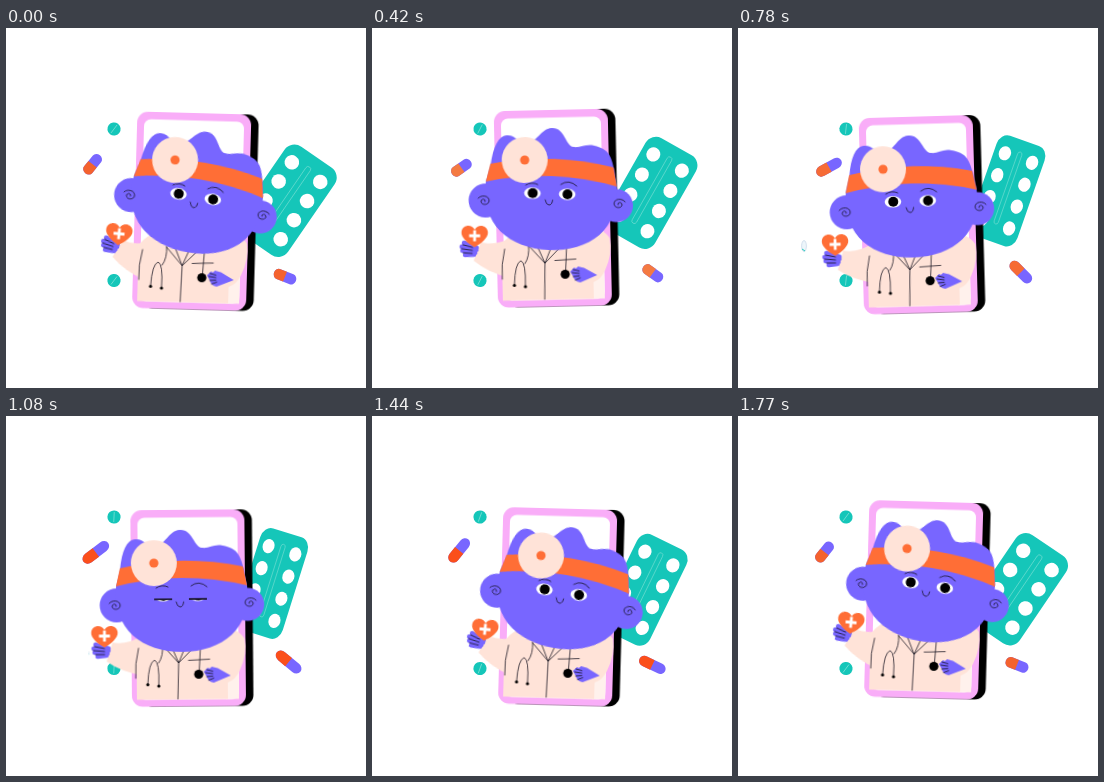
An HTML page for the animation above (1800 ms loop, 360 by 360 pixels).

```html
<!DOCTYPE html>
<html lang="en">
<head>
<meta charset="utf-8">
<title>Phone doctor</title>
<style>
  @property --x { syntax: "<number>"; inherits: false; initial-value: 0; }
  @property --y { syntax: "<number>"; inherits: false; initial-value: 0; }
  @property --r { syntax: "<number>"; inherits: false; initial-value: 0; }
  @property --k { syntax: "<number>"; inherits: false; initial-value: 0; }

  html, body { margin: 0; width: 100%; height: 100%; overflow: hidden; background: #fff; }
  svg {
    display: block; width: 100%; height: 100%;
    --purple: #7866ff; --orange: #ff6e36;
    --teal: #15c6b9; --cream: #ffe3d8; --pink: #f9adf8; --ink: #120f1c;
  }

  /* Sine drift: centre (c*), amplitude (a*) and peak time through the delays */
  .float {
    animation: x .9s, y .9s, r .9s, k .9s;
    animation-timing-function: cubic-bezier(.364, 0, .636, 1);
    animation-iteration-count: infinite;
    animation-direction: alternate;
    animation-delay: var(--dx, 0s), var(--dy, 0s), var(--dr, 0s), var(--dk, 0s);
    transform:
      translate(calc((var(--cx) + var(--ax) * var(--x)) * 1px), calc((var(--cy) + var(--ay) * var(--y)) * 1px))
      rotate(calc((var(--cr) + var(--ar) * var(--r)) * 1deg))
      scaleX(calc(var(--ck) + var(--ak) * var(--k)));
    --cx: 0; --ax: 0; --cy: 0; --ay: 0; --cr: 0; --ar: 0; --ck: 1; --ak: 0;
  }
  @keyframes x { from { --x: 1; } to { --x: -1; } }
  @keyframes y { from { --y: 1; } to { --y: -1; } }
  @keyframes r { from { --r: 1; } to { --r: -1; } }
  @keyframes k { from { --k: 1; } to { --k: -1; } }

  .pack { --cx: 273.5; --ax: 8; --dx: -1.64s; --cy: 168.5; --ay: 6; --dy: -.22s;
          --cr: 26; --ar: 9; --dr: -1.71s; --ck: .92; --ak: .1; --dk: -1.7s; }
  .capL { --cx: 88.7; --ax: 2.3; --dx: -1.02s; --cy: 137.2; --ay: 2.8; --dy: -1.25s;
          --cr: -41; --ar: 12; --dr: -1.08s; --ak: .18; --dk: -.67s; }
  .capR { --cx: 281; --ax: 2; --dx: -.9s; --cy: 246.7; --ay: 2.6; --dy: -.2s;
          --cr: 33; --ar: 12; --dr: -1s; --ak: .16; --dk: -.67s; }
  .tablet { --cx: 108; --cr: 20; --ar: 18; --dr: -1.71s; }
  .bob { --ay: 6.5; --dy: -.59s; }

  /* The capsule caps redden as they swing round */
  .tint { animation: tint 1.8s ease-in-out infinite; }
  @keyframes tint {
    0%, 100% { color: #f4622e; }
    20%, 32% { color: #f47a42; }
    60%, 80% { color: #fb4f1b; }
  }

  .tilt { transform-origin: 184px 282px; animation: tilt 1.8s ease-in-out infinite; }
  @keyframes tilt {
    0%, 82%, 100% { transform: rotate(1.6deg); }
    30%, 45% { transform: rotate(-1.6deg); }
  }

  .turn { animation: turn 1.8s ease-in-out infinite; }
  @keyframes turn {
    0%, 14%, 79%, 100% { transform: translate(var(--sx, 0px), var(--sy, 0px)) rotate(var(--a, 0deg)); }
    31.5% { transform: translate(0px, 0px) rotate(0deg); }
    59% { transform: translate(0px, var(--nod, 0px)) rotate(0deg); }
  }
  .head { --sx: 10px; --a: 8deg; --nod: 2px; }
  .body { --sx: 2px; }
  .arm { --sx: 2.5px; --sy: 1.5px; --a: 13deg; transform-origin: 130px 243px; }
  .heart { --a: -9deg; }

  .lid { transform: scaleY(0); animation: blink 1.8s infinite; }
  @keyframes blink {
    0%, 56.7%, 70%, 100% { transform: scaleY(0); }
    63.3% { transform: scaleY(1); }
  }

  .speck { opacity: 0; animation: speck 1.8s infinite; }
  @keyframes speck {
    0%, 38% { opacity: 0; transform: translate(64px, 214px); }
    43.3% { opacity: 1; transform: translate(66px, 218px); }
    60% { opacity: .8; transform: translate(83px, 237px) scale(.3); }
    62%, 100% { opacity: 0; transform: translate(85px, 239px) scale(.2); }
  }

  .line { fill: none; stroke: var(--ink); stroke-width: .75; stroke-linecap: round; stroke-linejoin: round; }
  .skin { fill: var(--purple); }
  .coat { fill: var(--cream); }
</style>
</head>
<body>
<svg viewBox="0 0 360 360">
  <defs>
    <g id="row" fill="#fff"><circle cx="-17" r="7.2"/><circle cx="17" r="7.2"/></g>
    <g id="tablet">
      <circle r="6.6" fill="var(--teal)"/>
      <path d="M0-5V5" stroke="#79ded4" stroke-width=".8"/>
    </g>
    <g id="capsule">
      <rect x="-13.2" y="-5.3" width="26.4" height="10.6" rx="5.3" fill="var(--purple)"/>
      <path d="M0-5.3H-7.9A5.3 5.3 0 0 0-7.9 5.3H0Z" fill="currentColor"/>
    </g>
    <g id="eye">
      <ellipse rx="8.3" ry="5.8" fill="#fff"/>
      <circle cx=".3" r="5" fill="#000"/>
    </g>
    <g id="lid">
      <rect x="-9.5" width="19" height="13" class="skin"/>
      <rect x="-9" y="11.4" width="18" height="2" fill="var(--ink)"/>
    </g>
    <path id="curl" class="line" d="M-6-2C-3-6 5-5 5 0C5 5-3 5-3 1C-3-2 2-2 1 1"/>
  </defs>

  <g class="float pack">
    <rect x="-30" y="-53" width="60" height="106" rx="12" fill="var(--teal)"/>
    <use href="#row" y="-34.8"/><use href="#row" y="-11.6"/>
    <use href="#row" y="11.6"/><use href="#row" y="34.8"/>
    <rect x="-2.6" y="-41" width="5.2" height="76" rx="2.6" fill="none" stroke="#6fdcd1" stroke-width=".7"/>
  </g>
  <g class="float tablet" style="--cy:101"><use href="#tablet"/></g>
  <g class="float tablet" style="--cy:252.5"><use href="#tablet"/></g>
  <g class="float capL"><g class="tint"><use href="#capsule"/></g></g>
  <g class="float capR"><g class="tint"><use href="#capsule"/></g></g>
  <g class="speck">
    <ellipse rx="2.4" ry="5.5" fill="#eef6fb" stroke="#c3d3e6" stroke-width=".7"/>
    <path d="M-2 3L1 5" stroke="var(--teal)"/>
  </g>

  <g class="float bob"><g class="tilt">
    <rect x="135" y="88" width="112.5" height="196.5" rx="11"/>
    <rect x="126" y="88" width="114" height="196.5" rx="11" fill="var(--pink)"/>
    <rect x="133" y="95.5" width="100" height="182" rx="7" fill="#fff"/>

    <g class="turn arm">
      <path class="coat" d="M107 220Q120 223 136 214V253Q115 249 101 239Z"/>
      <path d="M103 226L90 222M103 228L88 226M102 231L89 230M101 233L92 234" fill="none"
        stroke="var(--purple)" stroke-width="4.5" stroke-linecap="round"/>
      <path class="line" d="M99 226L89 224M99 229L88 228M99 232L90 232"/>
      <g transform="translate(99 213.5)"><g class="turn heart">
        <path fill="var(--orange)" d="M0 11.5C-6 8-14 2-13.2-4C-12-11-3-12 0-6C3-12 12-11 13.2-4C14 2 6 8 0 11.5Z"/>
        <path d="M0-5.5V5.5M-5.5 0H5.5" stroke="#fff" stroke-width="2.8"/>
      </g></g>
    </g>

    <rect x="220" y="250" width="13" height="27.5" fill="#fff1ec"/>
    <path class="coat" d="M131 277.5V222Q140 208 160 206H215Q232 206 239 217Q242 232 234 249Q230 258 222 261V277.5Z"/>
    <g class="turn body">
      <path class="line" d="M133 226Q129 242 130 256M157 223L173 241L190 224M165 222L173 241L181 222M173 241L172 277"/>
      <path class="line" d="M142 262Q143 240 149 238Q154 240 153 263M157 222Q158 234 153 241M195 224L193.5 250M183 238.5L204 237.5"/>
      <circle cx="142" cy="262.5" r="1.6"/><circle cx="153" cy="264" r="1.6"/>
      <circle cx="193" cy="252.5" r="4.6"/>
      <path class="skin" d="M198 250L202 246Q204 248 206 245L212 246.5L225 254L208 261Q202 260 201 255Z"/>
      <path class="line" d="M201 248L207 249.5M200 251L207 252M201 255L207 254.5M203 258.5L208 256.5"/>
    </g>

    <g transform="translate(177 180)"><g class="turn head">
      <circle class="skin" cx="-65.5" cy="1" r="17"/>
      <circle class="skin" cx="65.5" cy="1" r="16.5"/>
      <path class="skin" d="M-62-34C-60-54-55-64-47-65C-38-66-36-58-28-58C-16-58-14-73-2-74C11-75 12-57 20-56C28-55 32-60 41-58C55-55 58-50 62-34L65-18C70 25 40 48 0 48C-40 48-70 25-66-18Z"/>
      <use href="#curl" x="-67" y="1"/>
      <use href="#curl" x="-68" y="-1" transform="scale(-1 1)"/>
      <g transform="translate(-19 -8.2)">
        <use href="#eye"/>
        <g transform="translate(0 -6.5)"><g class="lid"><use href="#lid"/></g></g>
      </g>
      <g transform="translate(15.8 -8.4)">
        <use href="#eye"/>
        <g transform="translate(0 -6.5)"><g class="lid"><use href="#lid"/></g></g>
      </g>
      <path class="line" d="M9-18Q17-24 25-17M-26-16Q-20-20-14-17M-6-2Q-5 3-2 3Q1 3 1.5-2"/>
      <path fill="var(--orange)" d="M-62-36Q0-50 61-37L65-18Q0-34-66-18Z"/>
      <circle class="coat" cx="-28" cy="-41" r="23"/>
      <circle cx="-28" cy="-41" r="4.6" fill="var(--orange)"/>
    </g></g>
  </g></g>
</svg>
</body>
</html>
```
